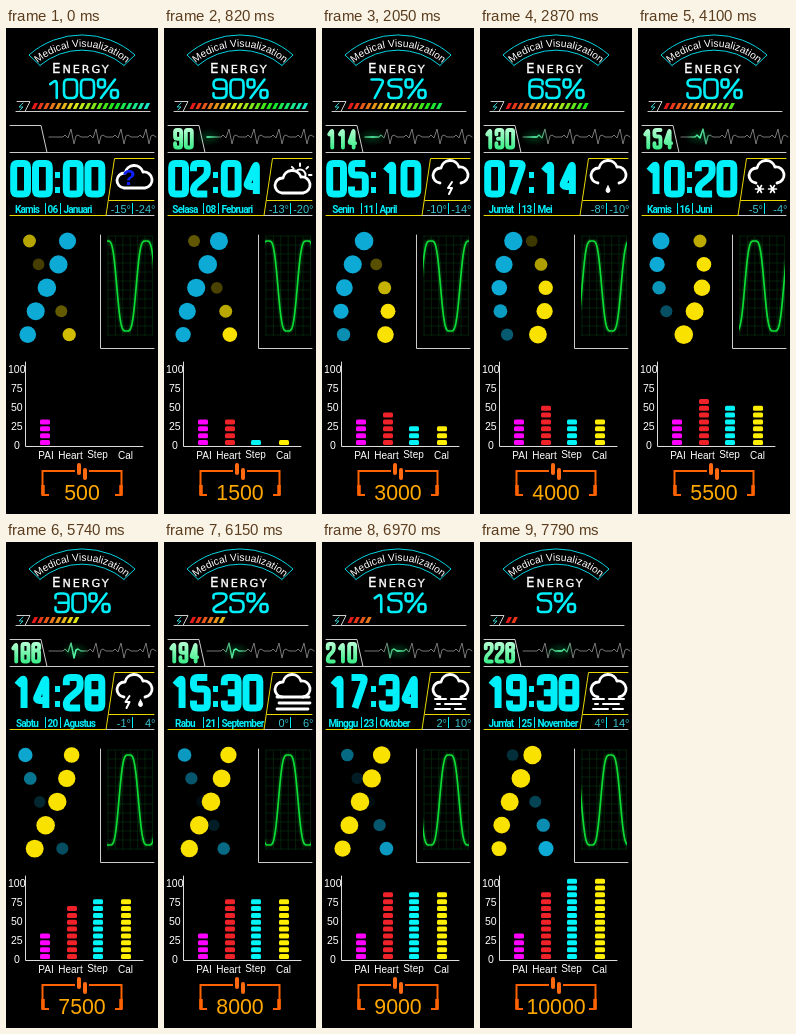
An HTML page that plays this animation: 152 by 486 pixels, repeating every 8.2 s.

```html
<!DOCTYPE html>
<html lang="id">
<head>
<meta charset="utf-8">
<title>Watch face</title>
<style>
  html, body { margin: 0; width: 100%; height: 100%; overflow: hidden; background: #000; }
  svg { display: block; width: 152px; height: 486px; font-family: "Liberation Sans", Arial, sans-serif; }
  .line { fill: none; stroke-linecap: round; stroke-linejoin: round; }
  .mid { text-anchor: middle; }
  .date { font: bold 10px Roboto, sans-serif; letter-spacing: -.8px; fill: #00eef8; }
  .temp { font-size: 11px; fill: #38c4d4; text-anchor: end; }
</style>
</head>
<body>
<svg viewBox="0 0 152 486">
  <defs>
    <path id="arc" d="M22 45.400A68 68 0 0 1 130 45.400"/>
    <path id="beat"/>
    <linearGradient id="mint" gradientUnits="userSpaceOnUse" x1="0" y1="100" x2="0" y2="122">
      <stop stop-color="#b8ffd4"/><stop offset="1" stop-color="#34ec84"/>
    </linearGradient>
    <linearGradient id="pulse" gradientUnits="userSpaceOnUse" x1="-12" y1="0" x2="12" y2="0">
      <stop stop-color="#2f8" stop-opacity="0"/><stop offset=".5" stop-color="#5fa"/>
      <stop offset="1" stop-color="#2f8" stop-opacity="0"/>
    </linearGradient>
    <radialGradient id="glow">
      <stop stop-color="#0f7" stop-opacity=".2"/><stop offset="1" stop-color="#0f7" stop-opacity="0"/>
    </radialGradient>
    <clipPath id="scope"><rect x="101" y="205" width="46" height="113"/></clipPath>
    <path id="wave"/>
  </defs>
  <rect width="152" height="486"/>

  <!-- title and energy -->
  <path class="line" stroke="#00d4e0" d="M34 37.400L23 27A80 80 0 0 1 129 27L118 37.400M34 37.400A65 65 0 0 1 118 37.400"/>
  <text font-size="10.300" fill="#fff" class="mid"><textPath href="#arc" startOffset="50%">Medical Visualization</textPath></text>
  <text x="46" y="45" fill="#fff" stroke="#fff" stroke-width=".35" style="font-family:'DejaVu Sans',sans-serif;letter-spacing:1.9px"><tspan font-size="13.500">E</tspan><tspan font-size="11.300">NERGY</tspan></text>
  <path id="energy" class="line" stroke="#00eef8" stroke-width="2.600"/>
  <path class="line" stroke="#ccc" d="M11 73.500H24L19 83.500M10 83.500H144"/>
  <path class="line" stroke="#3cc" d="M17 75L13 79H17L14 82"/>
  <g id="charge"></g>

  <!-- pulse, clock, date -->
  <path class="line" stroke="#ccc" d="M4 97.500H35L41 124.500M4 124.500H148M100 187.500H148"/>
  <path class="line" stroke="#e8d800" d="M148 130.500H108.500L100 187.500H4M103 172.500H148"/>
  <use href="#beat" class="line" stroke="#777"/>
  <g id="live">
    <ellipse id="halo" cy="109" rx="15" ry="9" fill="url(#glow)"/>
    <use href="#beat" class="line" stroke="url(#pulse)" stroke-width="1.500"/>
  </g>
  <path id="rate" class="line" stroke="url(#mint)" stroke-width="3.900"/>
  <path id="clock" class="line" stroke="#00f0fa" stroke-width="7" style="stroke-linecap:butt;stroke-linejoin:miter"/>
  <path fill="#00f0fa" d="M49 144h5v6h-5zM49 159h5v6h-5z"/>
  <g id="weather" class="line" stroke="#fff" stroke-width="2.800"></g>
  <text id="day" class="date mid" x="21" y="185"></text>
  <text id="date" class="date mid" x="46.500" y="185"></text>
  <text id="month" class="date" x="57.500" y="185"></text>
  <path stroke="#00eef8" d="M39.500 175V186M54.500 175V186M126.500 175V186"/>
  <text id="low" class="temp" x="125" y="185"></text>
  <text id="high" class="temp" x="149.500" y="185"></text>

  <!-- helix and scope -->
  <g id="helix"></g>
  <path id="grid" stroke="#0b5c1c" stroke-width=".8" opacity=".45"/>
  <path class="line" stroke="#ccc" d="M94.500 207V320.500H148"/>
  <g class="line" stroke="#0edc36" clip-path="url(#scope)">
    <use href="#wave" stroke-width="5" opacity=".15"/>
    <use href="#wave" stroke-width="1.700"/>
  </g>

  <!-- chart -->
  <g id="bars"></g>
  <path class="line" stroke="#ddd" d="M19.500 334V418.500H137"/>
  <g id="scale" class="mid" font-size="10.500" fill="#fff"></g>
  <g class="mid" font-size="10" fill="#fff">
    <text x="40" y="431">PAI</text><text x="64.500" y="431">Heart</text>
    <text x="91.500" y="430">Step</text><text x="119.500" y="431">Cal</text>
  </g>

  <!-- steps -->
  <g fill="none" stroke="#ff6200" stroke-width="2">
    <path d="M69 443H36.500V467H43M83 443H115.500V467H109"/>
    <path stroke-width="3.500" d="M37 457V467M115 457V467"/>
  </g>
  <g fill="#ff6a10">
    <rect x="71" y="435" width="4" height="12" rx="1.900"/>
    <rect x="77" y="440" width="4" height="12" rx="1.900"/>
  </g>
  <text id="steps" class="mid" x="76" y="471.700" font-size="21.300" fill="#ffa800"></text>
</svg>
<script>
const STEP = 410, COUNT = 20;
const DAYS = ["Minggu", "Senin", "Selasa", "Rabu", "Kamis", "Jum'at", "Sabtu"];
const MONTHS = ["Januari", "Februari", "Maret", "April", "Mei", "Juni", "Juli",
  "Agustus", "September", "Oktober", "November"];
// Digits as strokes on a 4 x 8 grid.
const DIGITS = ["20 40 48 08 00 20", "12 30 38", "02 00 40 43 06 08 48", "02 00 40 48 08 06|14 44",
  "38 30 06 46", "40 00 03 43 48 08 06", "42 40 00 08 48 43 03", "00 40 18",
  "20 40 48 08 00 20|04 44", "44 04 00 40 48 08 06"];
// One sky per step: letters pick the parts of the icon.
const SKIES = ["?", "s", "sc", "c", "scd", "cb", "cdf", "cd", "cdd", "cf", "cff", "cfff",
  "cdddd", "cddf", "cbd", "cm", "cm", "ch", "ch", "ch"];

const el = id => document.getElementById(id);
const put = (id, text) => { el(id).textContent = text; };
const draw = (id, d) => el(id).setAttribute("d", d);
const range = n => Array.from({ length: n }, (_, k) => k);
const pad = n => String(n).padStart(2, "0");

function stroke(points, radius) {
  const toward = (a, b) => {
    const dx = b[0] - a[0], dy = b[1] - a[1], len = Math.hypot(dx, dy);
    const k = Math.min(radius, len / 2) / len;
    return [a[0] + dx * k, a[1] + dy * k];
  };
  let d = "M" + points[0];
  for (let k = 1; k < points.length - 1; k++) {
    const p = points[k];
    d += "L" + toward(p, points[k - 1]) + "Q" + p + " " + toward(p, points[k + 1]);
  }
  return d + "L" + points[points.length - 1];
}

function digit(n, x, y, w, h, radius) {
  return DIGITS[n].split("|").map(part => stroke(
    part.split(" ").map(p => [x + p[0] * w / 4, y + p[1] * h / 8]), radius)).join("");
}

function percent(n) {
  const digits = [...String(n)];
  const x = 76.5 - (digits.length * 17 + 24) / 2 + 2;
  const end = x + digits.length * 17;
  return digits.map((c, k) => digit(+c, x + k * 17, 51.5, 13, 18.5, 5)).join("") +
    digit(0, end, 51.5, 7, 8, 3) + digit(0, end + 13, 62, 7, 8, 3) + `M${end + 17} 51.5L${end + 3} 70`;
}

function cloud(x, y, close) {
  return `<path d="M${x} ${y}a7.500 7.500 0 0 1 1-15a9.300 9.300 0 0 1 18-1a7.600 7.600 0 0 1 2 16${close ? "z" : ""}"/>`;
}

function flake(x, y) {
  return `<path stroke-width="1.600" d="M${x - 4} ${y}h8M${x - 2} ${y - 3.5}l4 7M${x + 2} ${y - 3.5}l-4 7"/>`;
}

const drop = (x, y) => `<path fill="#fff" stroke-width="1" d="M${x} ${y - 3}q4 6 0 6.500q-4-.5 0-6.500z"/>`;
const bolt = (x, y) => `<path stroke-width="2" d="M${x + 2} ${y - 7}l-4 6h4l-3 6"/>`;

function sun(x, y, r) {
  const rays = range(8).map(k => {
    const c = Math.cos(k * Math.PI / 4), s = Math.sin(k * Math.PI / 4);
    return `M${x + c * (r + 3.5)} ${y + s * (r + 3.5)}L${x + c * (r + 6)} ${y + s * (r + 6)}`;
  }).join("");
  return `<g stroke-width="2"><circle cx="${x}" cy="${y}" r="${r}"/><path d="${rays}"/></g>`;
}

function sky(kind) {
  if (kind === "?") {
    return cloud(118, 160, true) +
      '<text x="123" y="157" class="mid" font-size="22" font-weight="bold" fill="#1020ff" stroke="none">?</text>';
  }
  if (kind === "s") return sun(128, 151, 8);
  const low = kind === "sc", closed = low || kind === "c";
  let out = kind[0] === "s" ? sun(136, low ? 147 : 141, 5.5) : "";
  out += `<g fill="#000">${cloud(118, low ? 165 : closed ? 161 : 155, closed)}</g>`;
  if (kind.includes("m")) out += '<path d="M113 155H145M115 161H146M113 167H144"/>';
  if (kind.includes("h")) {
    out += '<path stroke-width="2" d="M113 157H124M129 157H144M115 162H118M123 162H139M113 167H128M133 167H143"/>';
  }
  const fall = [...kind].filter(c => "dfb".includes(c));
  fall.forEach((c, k) => {
    const x = 128 + (k - (fall.length - 1) / 2) * (fall.length > 2 ? 7.5 : 13);
    const y = 161 + (fall.length > 2 && k % 2 ? 5 : 0);
    out += { d: drop, f: flake, b: bolt }[c](x, y);
  });
  return out;
}

function helix(i) {
  const dots = [];
  for (let row = 0; row < 5; row++) {
    ["#0caad4", "#fae200"].forEach((color, side) => {
      const a = (54 - 11 * i - 29 * row + 180 * side) * Math.PI / 180;
      const z = Math.cos(a), edge = Math.abs(Math.sin(a));
      dots.push({ z, color, x: 42.5 + 23.5 * Math.sin(a), y: 213 + 23.4 * row,
        r: 7.5 + 1.8 * z, fade: z > 0 ? 1 : edge ** 1.5 });
    });
  }
  return dots.sort((p, q) => p.z - q.z).map(p =>
    `<circle cx="${p.x}" cy="${p.y}" r="${p.r}" fill="#000"/>` +
    `<circle cx="${p.x}" cy="${p.y}" r="${p.r}" fill="${p.color}" opacity="${p.fade}"/>`).join("");
}

// A sine with flattened crests and steep sides.
function wave(i) {
  const peak = 101 + 1.55 * i;
  return "M" + range(97).map(k => {
    const x = 100 + k / 2, c = Math.cos((x - peak) * Math.PI / 19.5);
    return x + " " + (258 - 45 * Math.sin(c * Math.PI / 2)).toFixed(2);
  }).join("L");
}

function column(x, color, n) {
  return range(n).map(k =>
    `<rect x="${x}" y="${412 - 6.85 * k}" width="10" height="5" rx="1.500" fill="${color}"/>`).join("");
}

function show(i) {
  const energy = 100 - 5 * i, bpm = 74 + 8 * i, steps = 500 * (i + 1);
  draw("energy", percent(energy));
  const lit = 2 * Math.min(10, Math.floor(energy / 10) + 1);
  el("charge").innerHTML = range(lit).map(k =>
    `<path fill="hsl(${k * 9},80%,50%)" d="M${25.5 + k * 5.9} 81l3-6h3.500l-3 6z"/>`).join("");

  const nums = i ? String(bpm) : "";
  draw("rate", [...nums].map((c, k) =>
    digit(+c, 19.5 + (k - nums.length / 2) * 10.7 + 2.3, 102, 6, 17.5, 2)).join(""));
  el("live").style.display = i ? "" : "none";
  const x = 40 + 2.1 * i;
  el("pulse").setAttribute("gradientTransform", `translate(${x})`);
  el("halo").setAttribute("cx", x);

  const left = [7.7, 29.5, 60.3, 82];
  draw("clock", [...(pad(i) + pad(2 * i))].map((c, k) =>
    digit(+c, left[k], 135.5, 13.8, 30.5, 4)).join(""));
  el("weather").innerHTML = sky(SKIES[i]);

  const month = Math.ceil(i / 2), date = 6 + i;
  put("day", DAYS[new Date(2022, month, date).getDay()]);
  put("date", pad(date));
  put("month", MONTHS[month]);
  put("low", i - 15 + "°");
  put("high", 2 * i - 24 + "°");

  el("helix").innerHTML = helix(i);
  draw("wave", wave(i));
  const walked = Math.floor(steps * 12 / 10000);
  el("bars").innerHTML = column(34, "#ff00ff", 4) +
    column(61, "#ee2228", i ? Math.floor(bpm / 21) : 0) +
    column(87, "#00f4f8", walked) + column(115, "#ffee00", walked);
  put("steps", steps);
}

draw("beat", "M43 109H50" + "h7l2-2 2 2 1 1 3-9 3 15 2-8 2-1 3 2".repeat(4));
draw("grid", range(7).map(k => `M${102 + 7.4 * k} 208V308`).join("") +
  range(12).map(k => `M101 ${208 + 9 * k}H147`).join(""));
el("scale").innerHTML = range(5).map(k =>
  `<text x="10.800" y="${344.5 + 19.1 * k}">${100 - 25 * k}</text>`).join("");

const start = performance.now();
let shown = -1;
function tick() {
  const i = Math.floor((performance.now() - start) / STEP) % COUNT;
  if (i !== shown) show(shown = i);
  requestAnimationFrame(tick);
}
tick();
</script>
</body>
</html>
```
